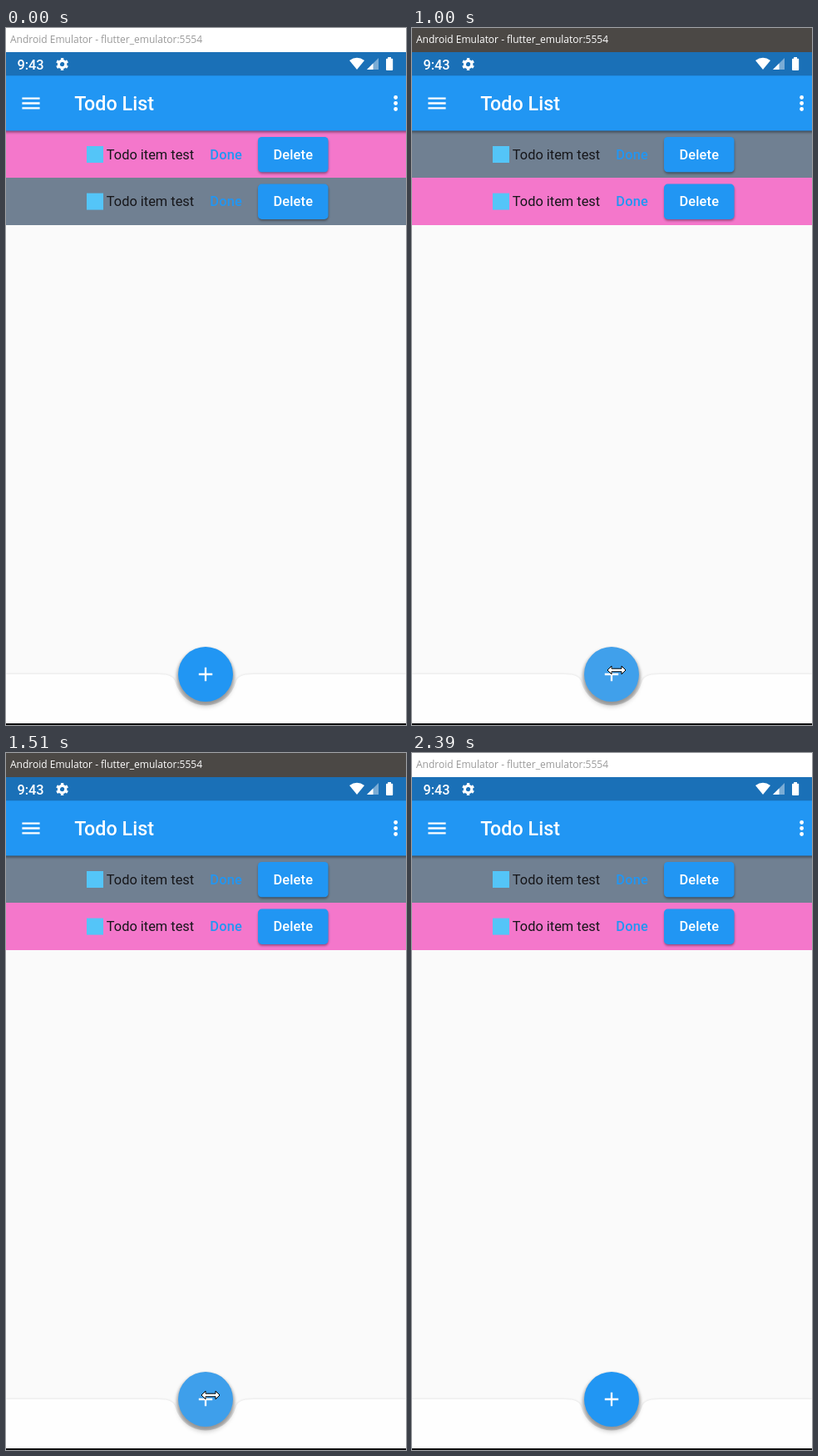
Recreate the animation shown at these times as an HTML page. Size 481 by 838 pixels, loop 2.46 s.

```html
<!DOCTYPE html>
<html lang="en">
<head>
<meta charset="utf-8">
<title>Todo List</title>
<style>
  html, body { margin: 0; width: 100%; height: 100%; overflow: hidden; background: #fafafa; }
  svg { display: block; width: 100%; height: 100%; }
  text { font-family: Roboto, sans-serif; font-size: 16.4px; white-space: pre; }
  .med { font-weight: 500; }
  .btn { font-weight: 500; text-anchor: middle; letter-spacing: .15px; }
  #caption { font-family: "Open Sans", sans-serif; font-size: 12px; }
</style>
</head>
<body>
<svg viewBox="0 0 481 838">
  <defs>
    <filter id="soft" x="-20%" y="-60%" width="140%" height="220%"><feGaussianBlur stdDeviation="1.6"/></filter>
    <filter id="wide" x="-30%" y="-30%" width="160%" height="160%"><feGaussianBlur stdDeviation="3"/></filter>
    <path id="bar" d="M0 777H183.8Q201.3 777 203.7 786.4A37.5 37.5 0 0 0 276.3 786.4Q278.7 777 296.2 777H481V836H0Z"/>
    <g id="item">
      <rect x="97" y="142" width="20" height="20" fill="#54c5f8"/>
      <text x="120.8" y="157.8" fill="#16161a">Todo item test</text>
      <text class="btn" x="264.6" y="157.8" fill="#2196f3">Done</text>
      <rect x="303.5" y="133" width="84" height="42" rx="4.5" opacity=".42" filter="url(#soft)"/>
      <rect x="303" y="131" width="84.5" height="42.3" rx="4.5" fill="#2196f3"/>
      <text class="btn" x="345.3" y="157.8" fill="#fff">Delete</text>
    </g>
  </defs>

  <rect width="481" height="838" fill="#fafafa"/>

  <!-- list -->
  <rect id="row0" y="123" width="481" height="57"/>
  <rect id="row1" y="180" width="481" height="57"/>
  <rect x="-10" y="100" width="501" height="25.5" opacity=".42" filter="url(#soft)"/>
  <use href="#item"/>
  <use href="#item" y="56.6"/>

  <!-- app bar -->
  <rect y="57" width="481" height="66.5" fill="#2196f3"/>
  <path d="M19.4 84.6H40.6M19.4 90.5H40.6M19.4 96.4H40.6" stroke="#fff" stroke-width="2.4"/>
  <text class="med" x="82.3" y="99" fill="#fff" style="font-size:23.3px">Todo List</text>
  <g fill="#fff">
    <circle cx="468.6" cy="83.5" r="2.4"/>
    <circle cx="468.6" cy="90.5" r="2.4"/>
    <circle cx="468.6" cy="97.5" r="2.4"/>
  </g>

  <!-- status bar -->
  <rect y="29" width="481" height="28.3" fill="#1a70b7"/>
  <g fill="#fff">
    <text class="med" x="13.4" y="49.8">9:43</text>
    <g fill="none" stroke="#fff" transform="translate(67.6 43.6) rotate(15)">
      <circle r="4.2" stroke-width="3.2"/>
      <circle r="6.1" stroke-width="2.8" pathLength="12" stroke-dasharray="1 1"/>
    </g>
    <path d="M422 50L413 39Q422 32.5 431 39Z"/>
    <path d="M434 50H448V36Z" opacity=".42"/>
    <path d="M434 50H441.5V42.5Z"/>
    <rect x="457" y="36.7" width="8.2" height="14.2" rx="1"/>
    <rect x="459.2" y="35" width="3.8" height="2.5"/>
  </g>

  <!-- window caption -->
  <rect id="frame" width="481" height="29"/>
  <text id="caption" x="5" y="18">Android Emulator - flutter_emulator:5554</text>

  <!-- bottom bar and button -->
  <use href="#bar" opacity=".13" filter="url(#soft)"/>
  <circle cx="240" cy="780" r="35" fill="#c6c6c6" filter="url(#soft)"/>
  <use href="#bar" fill="#fefefe"/>
  <circle cx="240" cy="782" r="33" opacity=".26" filter="url(#wide)"/>
  <circle id="fab" cx="240" cy="777" r="33"/>
  <path d="M231.8 777H248.2M240 768.8V785.2" stroke="#fff" stroke-width="2.3"/>
  <rect y="836" width="481" height="2" fill="#0c0c10"/>

  <path id="cursor" d="M-11 0l5 -5v3.2h12v-3.2l5 5l-5 5v-3.2h-12v3.2z" fill="#fff" stroke="#000"/>
</svg>
<script>
const LOOP = 2460, STEP = 72.8;
const PINK = '#f477cb', GREY = '#708092';
const IDLE = [33, 150, 243], PRESSED = [85, 166, 229];

// Pairs of step and value, joined by straight lines.
const press = [[9, 0], [12, .07], [14, .6], [17, 1], [18, .93], [21, .55], [24, 1], [26, .7], [30, 0]];
const cursorX = [[2, 468], [4, 352], [6, 270], [8, 246], [25, 246], [26, 258], [29, 418]];
const cursorY = [[2, 808], [4, 796], [6, 778], [8, 772], [25, 772], [26, 776], [29, 832]];

const $ = id => document.getElementById(id);
const set = (id, name, value) => $(id).setAttribute(name, value);

function track(keys, k) {
  if (k <= keys[0][0]) return keys[0][1];
  for (let i = 1; i < keys.length; i++) {
    const [k0, v0] = keys[i - 1], [k1, v1] = keys[i];
    if (k <= k1) return v0 + (v1 - v0) * (k - k0) / (k1 - k0);
  }
  return keys[keys.length - 1][1];
}

function draw(time) {
  const k = Math.floor((time % LOOP + 21) / STEP);

  const active = k >= 9 && k < 33;
  set('frame', 'fill', active ? '#4b4845' : '#fff');
  set('caption', 'fill', active ? '#fff' : '#9a9a9a');

  const swapped = k >= 12 && k < 18 || k >= 21;
  set('row0', 'fill', swapped ? GREY : PINK);
  set('row1', 'fill', swapped ? PINK : GREY);

  const p = track(press, k);
  set('fab', 'fill', `rgb(${IDLE.map((c, i) => Math.round(c + (PRESSED[i] - c) * p))})`);

  set('cursor', 'visibility', k >= 2 && k < 30 ? 'visible' : 'hidden');
  set('cursor', 'transform', `translate(${track(cursorX, k)} ${track(cursorY, k)})`);
}

const start = performance.now();
function tick() {
  draw(performance.now() - start);
  requestAnimationFrame(tick);
}
tick();
</script>
</body>
</html>
```
